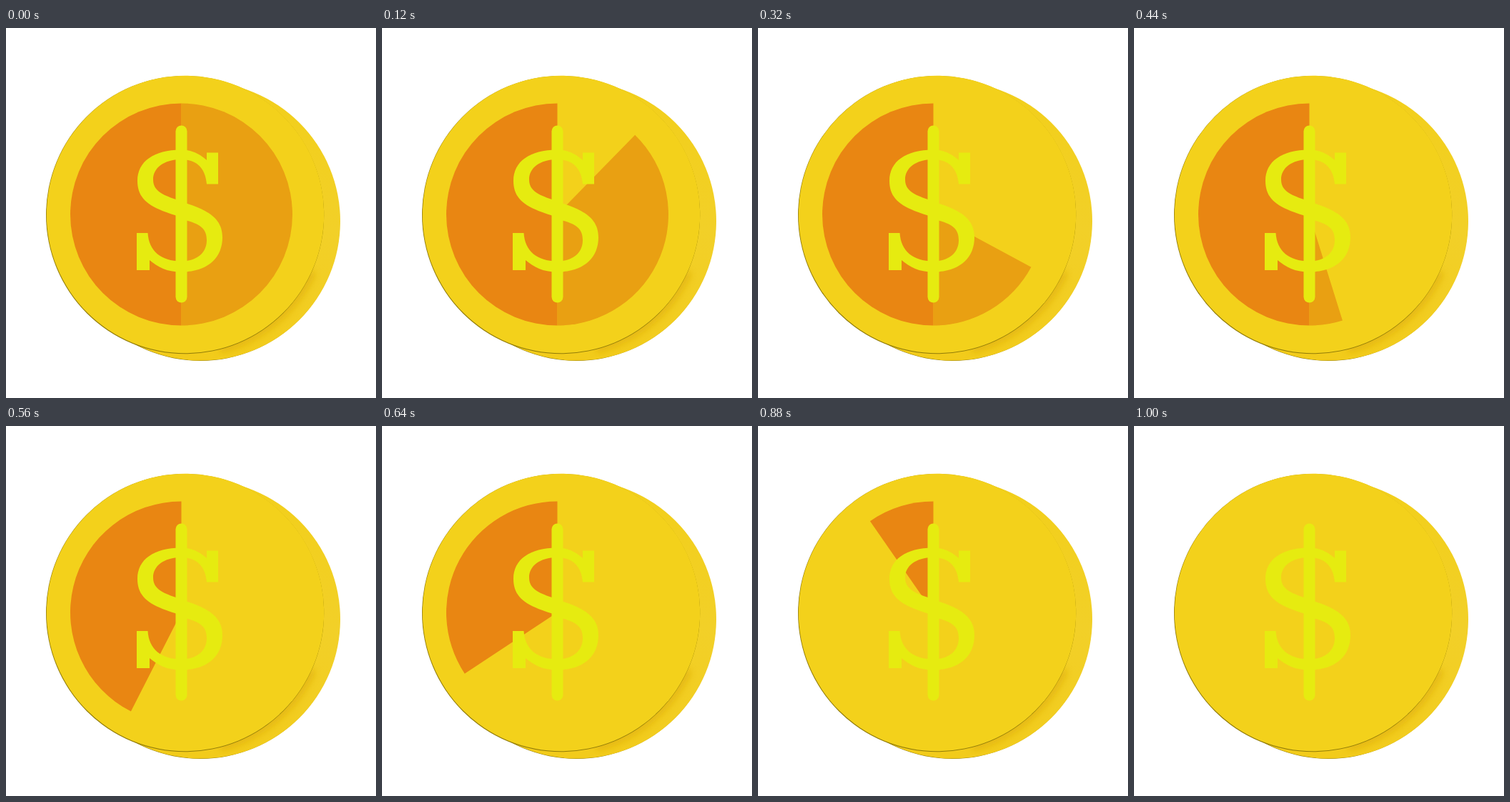
An HTML page that plays this animation: 518 by 518 pixels, repeating every 1040 ms.

```html
<!DOCTYPE html>
<html lang="en">
<head>
<meta charset="utf-8">
<title>Coin countdown</title>
<style>
  html, body { margin: 0; width: 100%; height: 100%; overflow: hidden; background: #fff; }
  svg { display: block; width: 100%; height: 100%; }
</style>
</head>
<body>
<svg viewBox="0 0 518 518">
  <defs>
    <linearGradient id="side" gradientUnits="userSpaceOnUse" x1="400" y1="110" x2="290" y2="466">
      <stop offset="0" stop-color="#f2cf1c"/>
      <stop offset=".4" stop-color="#f2d028"/>
      <stop offset="1" stop-color="#f2cb1a"/>
    </linearGradient>
    <clipPath id="back"><circle cx="273" cy="270.8" r="195"/></clipPath>
    <filter id="blur"><feGaussianBlur stdDeviation="5"/></filter>
  </defs>

  <!-- rim -->
  <circle cx="272.2" cy="270.9" r="195" fill="#8f7a08"/>
  <circle cx="273" cy="270.6" r="195" fill="url(#side)"/>
  <g clip-path="url(#back)">
    <path d="M428 341A194 194 0 0 1 300 449" fill="none" stroke="#e0b00c" stroke-width="12" opacity=".75" filter="url(#blur)"/>
  </g>

  <!-- face -->
  <circle cx="250.6" cy="261.6" r="194.6" fill="#8f7a08"/>
  <circle cx="251" cy="261" r="194.2" fill="#f3d11b"/>
  <path id="right" fill="#e9a012"/>
  <path id="left" fill="#e98612"/>

  <!-- dollar sign -->
  <g fill="#e6eb10">
    <path d="M281 174.5H297V218.5H281C279 195 266 184 245 184C221 184 206 196 206 212C206 227 217 233 238 240L254 246C288 257 303 270 303 293C303 323 281 341.5 245 341.5C225 341.5 213 335 201 325V339H183V287H198.5C200 312 217 326.5 245 326.5C267 326.5 281 315 281 297C281 281 272 275 253 269.5L238 262.5C200 251 184 239 184 214C184 187 207 170.5 245 170.5C260 170.5 271 176 281 185Z"/>
    <rect x="237.5" y="136.5" width="16" height="248" rx="8"/>
  </g>
</svg>
<script>
  const CX = 245.5, CY = 261, R = 155.5;
  const LOOP = 1040, STEP = 40, DEG_PER_STEP = 14.785;
  const right = document.getElementById('right');
  const left = document.getElementById('left');

  // Point on the dial, in degrees clockwise from the top
  const point = deg => {
    const a = deg * Math.PI / 180;
    return `${CX + R * Math.sin(a)} ${CY - R * Math.cos(a)}`;
  };

  const sector = (from, to) => from >= to ? '' :
    `M${CX} ${CY}L${point(from)}A${R} ${R} 0 0 1 ${point(to)}Z`;

  function draw(now) {
    const angle = Math.floor(now % LOOP / STEP) * DEG_PER_STEP;
    right.setAttribute('d', sector(angle, 180));
    left.setAttribute('d', sector(Math.max(angle, 180), 360));
  }

  const start = performance.now();
  function tick() {
    draw(performance.now() - start);
    requestAnimationFrame(tick);
  }
  tick();
</script>
</body>
</html>
```
